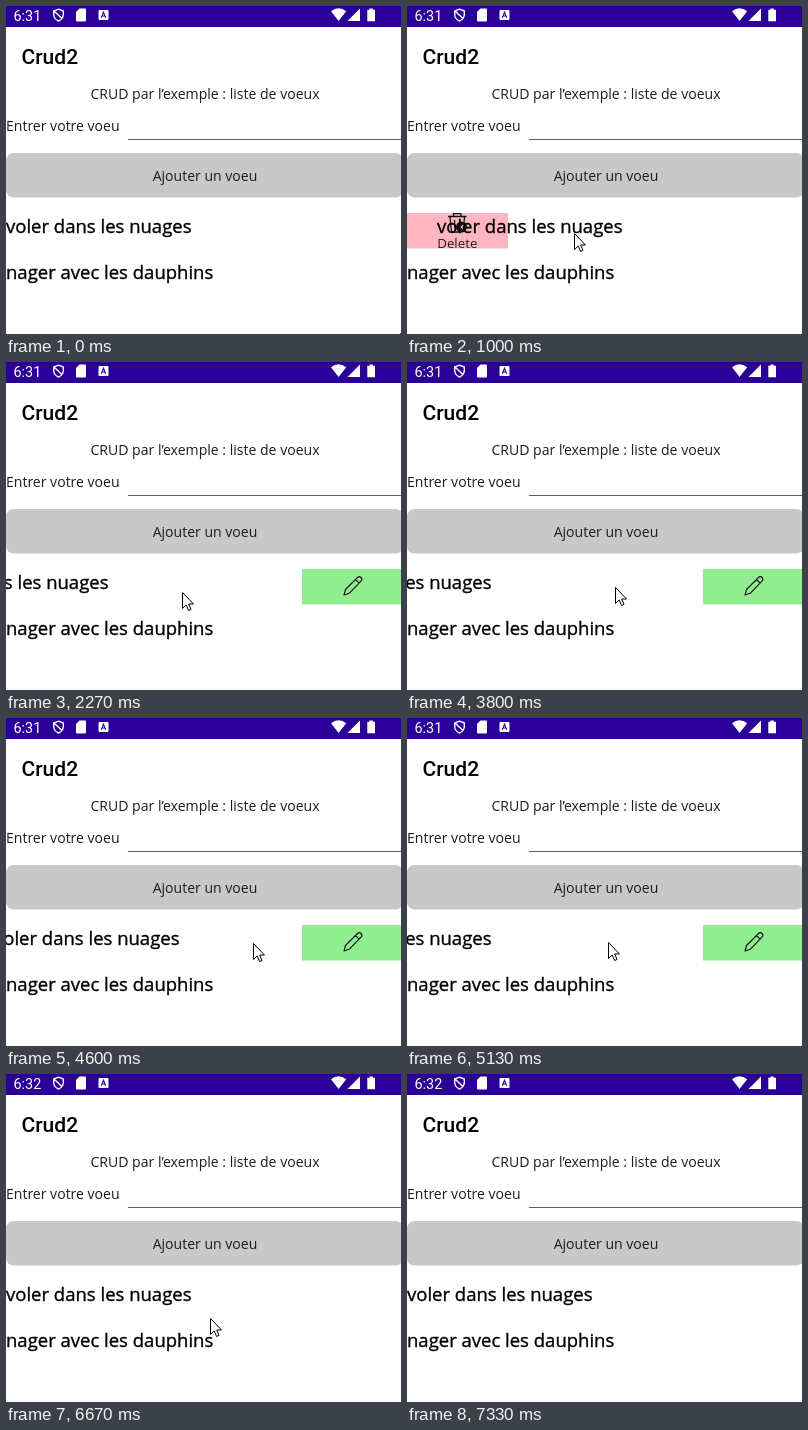
An HTML page that plays this animation: 395x328 px, repeating every 7.59 s.

```html
<!DOCTYPE html>
<html lang="fr">
<head>
<meta charset="utf-8">
<title>Liste de voeux</title>
<style>
html, body { margin: 0; width: 100%; height: 100%; overflow: hidden; background: #fff; }
svg { display: block; width: 395px; height: 328px; }
text { font: 14.05px "Open Sans", sans-serif; fill: #1c1c1c; white-space: pre; }
.mid { text-anchor: middle; }
.small { font-size: 13.3px; }
.row { font-size: 18.5px; fill: #000; stroke: #000; stroke-width: .35px; }
.title { font: 500 21px Roboto, sans-serif; fill: #000; }
.clock { font: 14.4px Roboto, sans-serif; fill: #fff; }
.line { fill: none; stroke: #111; stroke-width: 1.3; stroke-linejoin: round; }
.thin { stroke-width: 1.1; }
</style>
</head>
<body>
<svg viewBox="0 0 395 328">
  <rect width="395" height="328" fill="#fff"/>

  <!-- status bar -->
  <rect width="395" height="21" fill="#2b0098"/>
  <text id="clock" class="clock" x="7.5" y="14.6">6:31</text>
  <path d="M52.5 3.2 57.3 5V9Q57 13 52.5 15 48 13 47.7 9V5ZM48.500 5.500 56 12.500" fill="none" stroke="#fff" stroke-width="1.4"/>
  <g fill="#fff">
    <path d="M73.5 2.5H79Q80 2.5 80 3.5V14.5Q80 15.5 79 15.5H71Q70 15.5 70 14.5V6Z"/>
    <rect x="92.5" y="4" width="10" height="10" rx="1"/>
    <path d="M325 5.2Q332.5 -.6 340.2 5.2L332.6 15Z"/>
    <path d="M354 2.5V15H341.5Z"/>
    <path d="M363.5 2.5H366.8V3.8H369V15.3H361.3V3.8H363.5Z"/>
  </g>
  <path d="M95.3 11.8 97.5 6.3 99.7 11.8M96.2 10H98.8" stroke="#2b0098" stroke-width="1.1" fill="none"/>

  <!-- form -->
  <text class="title" x="15.5" y="57.5">Crud2</text>
  <text class="mid" x="199" y="93">CRUD par l’exemple : liste de voeux</text>
  <text x="0" y="125">Entrer votre voeu</text>
  <rect x="122" y="133" width="273" height="1" fill="#606060"/>
  <rect y="147" width="397" height="44.5" rx="7.5" fill="#c8c8c8"/>
  <text class="mid" x="199" y="174.5">Ajouter un voeu</text>

  <!-- swipe actions -->
  <g id="del">
    <rect y="207" width="101" height="35.5" fill="#ffb6c1"/>
    <path class="line" d="M41 210.5H59.5M46.5 210V207.7H54V210M43 211 44.5 226H53M57.5 211 57 217M47.5 214 48 222"/>
    <circle cx="54.5" cy="221" r="5.5" fill="#111"/>
    <path d="M52.5 219 56.5 223M56.5 219 52.5 223" stroke="#ffb6c1" stroke-width="1.2"/>
    <text class="mid small" x="50.3" y="242">Delete</text>
  </g>
  <g id="edit">
    <rect x="296" y="207" width="99" height="35.5" fill="#90ee90"/>
    <path class="line thin" d="M338 233 339.5 227.5 351.5 215.5Q353.3 213.7 355 215.5 356.8 217.3 355 219.2L343.2 231.3ZM349.5 217.5 353.2 221.2"/>
  </g>

  <text id="wish" class="row" y="227">voler dans les nuages</text>
  <text class="row" y="273">nager avec les dauphins</text>

  <path id="cursor" d="M.5 .5V16.5L4.2 13 6.6 18.5 9 17.4 6.7 12H11.5Z" fill="#fff" stroke="#000"/>
</svg>
<script>
const LOOP = 7590, OPEN = 101, HOLD = 80, LEAVE = 110, CLOCK_TURN = 99;
const START = { x: 394, y: 327 };

// Eased pointer moves in steps of 1/15 s; a move with a grab x drags the first row.
const move = (from, to, x, y, grab) => ({ from, to, x, y, grab });
const moves = [
  move(0, 10, 112, 222),
  move(12, 18.5, 237, 233, 137),
  move(22, 26, 229, 232),
  move(27, 29, 259, 232),
  move(30, 35.5, 157, 229, 259),
  move(35.5, 37, 219, 227),
  move(44, 47, 249, 228),
  move(49, 54, 208, 225),
  move(57, 61, 309, 226, 208),
  move(64, 68, 259, 225),
  move(68, 72.7, 157, 224, 259),
  move(72.7, 78, 205, 224),
  move(81, 86, 306, 222, 205),
  move(86, 89.9, 166, 219, 270),
  move(90, 93, 198, 222),
  move(94, 97, 225, 226, 198),
  move(97, 105, 160, 284),
  move(105, LEAVE, 109, 328)
];

const $ = id => document.getElementById(id);
const show = (el, on) => el.setAttribute("visibility", on ? "visible" : "hidden");
const clamp = (v, lo, hi) => Math.max(lo, Math.min(hi, v));
const ease = u => u * u * (3 - 2 * u);
const clock = $("clock"), del = $("del"), edit = $("edit"), wish = $("wish"), cursor = $("cursor");

function pointer(step) {
  let { x, y } = START;
  for (const m of moves) {
    const u = ease(clamp((step - m.from) / (m.to - m.from), 0, 1));
    x += (m.x - x) * u;
    y += (m.y - y) * u;
  }
  return { x: Math.round(x), y: Math.round(y) };
}

// The row follows the drag, then snaps open after a long pull or shut after a short one.
function rowOffset(step, x) {
  const drag = moves.filter(m => m.grab && m.from < step).pop();
  if (!drag) return 0;
  const reach = drag.x - drag.grab, side = Math.sign(reach) * OPEN;
  if (step >= drag.to) return Math.abs(reach) > HOLD ? side : 0;
  return clamp(x - drag.grab, Math.min(0, side), Math.max(0, side));
}

function draw(ms) {
  const step = Math.min(LEAVE, Math.floor((ms % LOOP) * 0.015 + 0.06));
  const { x, y } = pointer(step);
  const dx = rowOffset(step, x);
  wish.setAttribute("x", dx);
  show(del, dx > 0);
  show(edit, dx < 0);
  cursor.setAttribute("transform", `translate(${x} ${y})`);
  show(cursor, step < LEAVE);
  clock.textContent = step < CLOCK_TURN ? "6:31" : "6:32";
}

function tick() {
  draw(performance.now());
  requestAnimationFrame(tick);
}
tick();
</script>
</body>
</html>
```
